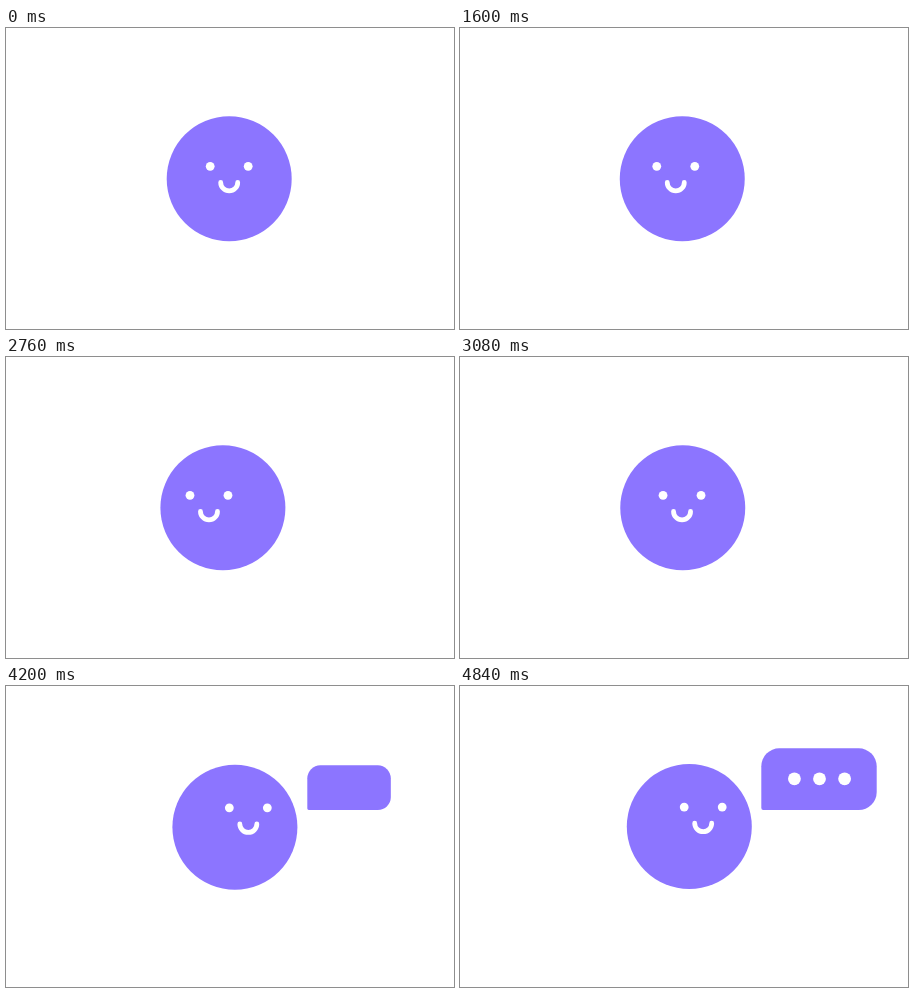
An HTML page with a canvas that plays this animation: 448x301 px, repeating every 5000 ms.

```html
<!DOCTYPE html>
<html lang="en">
<head>
<meta charset="utf-8">
<title>Chatty face</title>
<style>
  html, body { margin: 0; width: 100%; height: 100%; overflow: hidden; background: #fff; }
  canvas { display: block; width: 448px; height: 301px; }
</style>
</head>
<body>
<canvas id="stage" width="448" height="301"></canvas>
<script>
const ctx = document.getElementById('stage').getContext('2d');
const LOOP = 5000, STEP = 40;
const PURPLE = '#8c75ff', WHITE = '#fff';
const HOME = { x: 223.2, y: 150.8 };

// Each move sends the face and the body to new offsets from home.
const MOVES = [
  { start: 207,  face: [23.5, 0],   body: [6.1, 0] },
  { start: 1447, face: [-23.5, 0],  body: [-6.3, 0] },
  { start: 2736, face: [0, 0],      body: [0, 0] },
  { start: 3847, face: [20, -17.2], body: [6.1, -10.2] }
];
const MOVE_TIME = 650, BODY_LAG = 30;

const progress = (t, start, length) => Math.min(1, Math.max(0, (t - start) / length));
const easeOut = u => 1 - (1 - u) ** 4;
const easeOutBack = (u, c) => 1 + (c + 1) * (u - 1) ** 3 + c * (u - 1) ** 2;

function offset(part, t, lag) {
  let x = 0, y = 0;
  for (const move of MOVES) {
    const k = easeOut(progress(t, move.start + lag, MOVE_TIME));
    x += (move[part][0] - x) * k;
    y += (move[part][1] - y) * k;
  }
  return [HOME.x + x, HOME.y + y];
}

function dot(x, y, r, color) {
  ctx.fillStyle = color;
  ctx.beginPath();
  ctx.arc(x, y, r, 0, 2 * Math.PI);
  ctx.fill();
}

function drawFace(x, y) {
  dot(x - 19, y - 12.5, 4.4, WHITE);
  dot(x + 19, y - 12.5, 4.4, WHITE);
  ctx.strokeStyle = WHITE;
  ctx.lineWidth = 4.8;
  ctx.lineCap = 'round';
  ctx.beginPath();
  ctx.arc(x, y + 3.6, 8.5, 0, Math.PI);
  ctx.stroke();
}

function drawBubble(t) {
  const u = progress(t, 4083, 520);
  if (!u) return;
  const scale = easeOutBack(u, 1.4);
  ctx.save();
  ctx.translate(301.3, 124);
  ctx.scale(scale, scale);
  ctx.fillStyle = PURPLE;
  ctx.beginPath();
  ctx.roundRect(0, -61.7, 115.4, 61.7, [18, 18, 18, 2]);
  ctx.fill();
  ctx.restore();
  for (let i = 0; i < 3; i++) {
    const k = easeOut(progress(t, 4400 + 80 * i, 260));
    if (k) dot(334.4 + 25.1 * i, 92.8, 6.4 * k, WHITE);
  }
}

function draw(now) {
  const t = Math.floor((now % LOOP) / STEP) * STEP;
  ctx.fillStyle = WHITE;
  ctx.fillRect(0, 0, 448, 301);
  dot(...offset('body', t, BODY_LAG), 62.5, PURPLE);
  drawFace(...offset('face', t, 0));
  drawBubble(t);
}

const begin = performance.now();
function tick() {
  draw(performance.now() - begin);
  requestAnimationFrame(tick);
}
tick();
</script>
</body>
</html>
```
